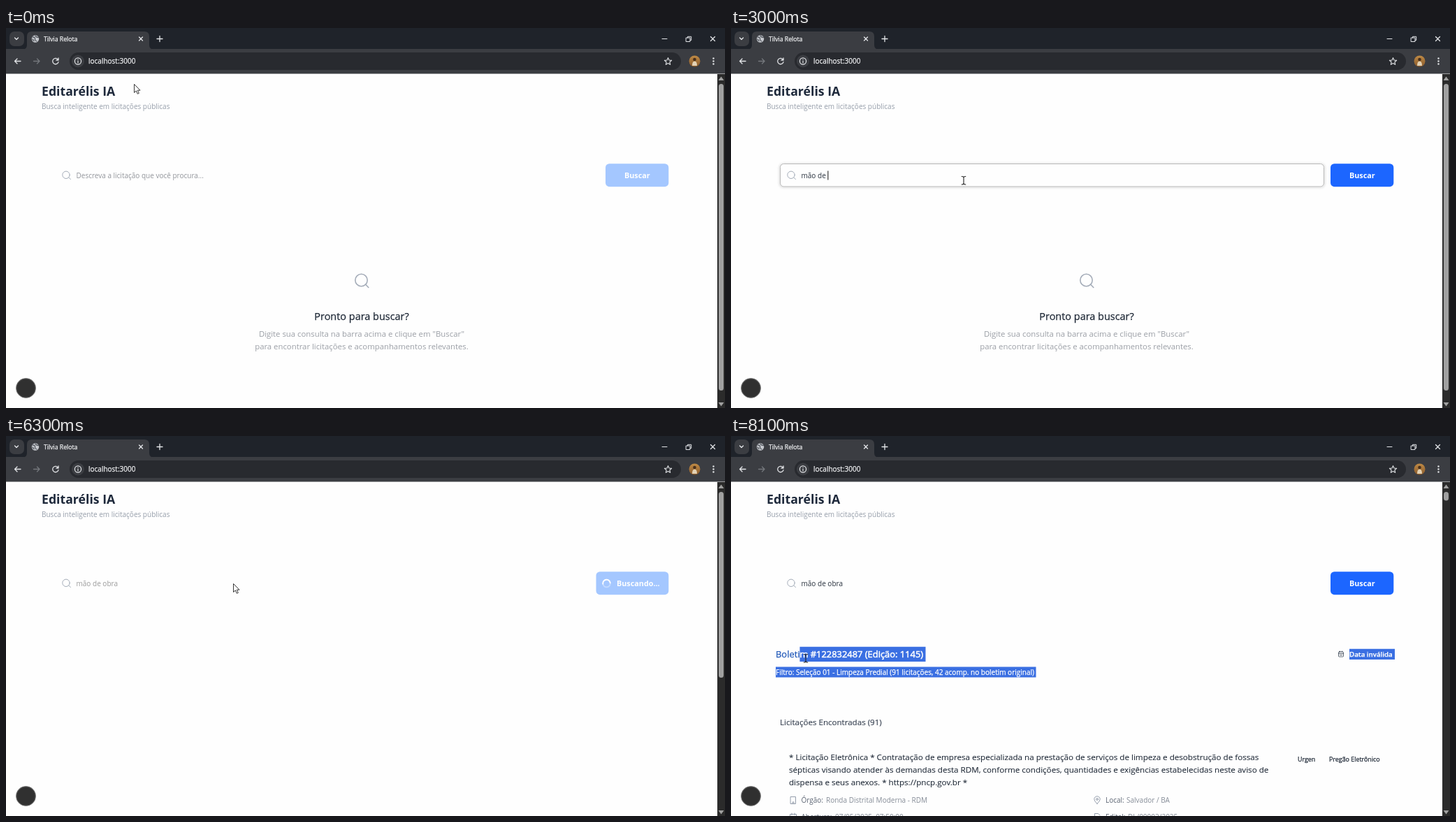
Animation, 1029 px wide and 544 px high, one loop 8200 ms. Source, as an HTML page:

```html
<!DOCTYPE html>
<html lang="pt-BR">
<head>
<meta charset="utf-8">
<title>Busca</title>
<style>
html, body { margin: 0; width: 100%; height: 100%; overflow: hidden; background: #fefefe; }
svg { display: block; width: 100vw; height: 100vh; }
text { font-family: 'Open Sans', 'Noto Sans', sans-serif; font-size: 10px; white-space: pre; }
.line { fill: none; stroke-linecap: round; stroke-linejoin: round; }
.semi { font-weight: 600; }
.bold { font-weight: 700; font-size: 10.8px; fill: #fff; }
.medium { stroke-width: .25; }
.dark { fill: #1f2937; stroke: #1f2937; }
.card { font-size: 11.64px; stroke-width: .1; }
.intro { font-size: 11.35px; fill: #9b9fa6; text-anchor: middle; }
.heading { font-size: 12.9px; }
.tag { font-size: 8.9px; }
.label { fill: #5b6472; }
.value { fill: #858c97; }
</style>
</head>
<body>
<svg viewBox="0 0 1029 544" preserveAspectRatio="none">
  <defs>
    <linearGradient id="photo" x1="0" y1="0" x2="0" y2="1">
      <stop offset="0" stop-color="#c08b45"/><stop offset="1" stop-color="#8a5a2b"/>
    </linearGradient>
    <filter id="soft" x="-5%" y="-30%" width="110%" height="160%"><feGaussianBlur stdDeviation="1.5"/></filter>
    <clipPath id="selClip">
      <rect id="selTitle" y="301.700" height="21.300"/>
      <rect id="selFilter" x="64" y="330.500" width="372.500" height="15"/>
      <rect id="selDate" x="885" y="304.700" width="65" height="15.300"/>
    </clipPath>
  </defs>
  <rect width="1029" height="544" fill="#fefefe"/>

  <!-- browser window -->
  <rect width="1029" height="31" fill="#1f232a"/>
  <rect y="30" width="1029" height="35.500" fill="#3b3d42"/>
  <rect x="5" y="5" width="21" height="21" rx="7" fill="#3b3d42"/>
  <path d="M23 31Q30 31 30 24V12Q30 5 37 5H198Q205 5 205 12V24Q205 31 212 31Z" fill="#3b3d42"/>
  <rect x="91" y="35" width="875" height="25" rx="12.500" fill="#282a2f"/>
  <circle cx="103" cy="47.500" r="9" fill="#3b3d42"/>
  <circle cx="42" cy="15.500" r="5.200" fill="#c6c9ce"/>
  <path d="M38 13Q42 13 41.500 15.500T44 19M42 11Q43 13.500 46.500 13.500M38 16L40 18.500" class="line" stroke="#565a61" stroke-width="1.300"/>
  <g class="medium" fill="#f0f1f3" stroke="#f0f1f3">
    <text x="54" y="19" style="font-size:8.7px">Tilvia Relota</text>
    <text x="118" y="51.300">localhost:3000</text>
  </g>
  <g class="line" stroke="#e3e5e8" stroke-width="1.300">
    <path d="M12.500 14L15 16.500L17.500 14"/>
    <path d="M190.500 13L195.500 18M195.500 13L190.500 18"/>
    <path d="M216 15.500H224M220 11.500V19.500"/>
    <path d="M939 15.500H946" stroke-width="1"/>
    <path d="M973.500 14H979V19.500H973.500ZM975.500 14V12.300H980.700V17.500H979" stroke-width="1"/>
    <path d="M1008.500 12.500L1014.500 18.500M1014.500 12.500L1008.500 18.500"/>
    <path d="M21 47.500H12.500M16 44L12.500 47.500L16 51"/>
    <path d="M39.500 47.500H48M44.500 44L48 47.500L44.500 51" stroke="#74777c"/>
    <path d="M74.500 45.300A4.200 4.200 0 1 0 75 48.600M75 43V46H72"/>
    <circle cx="103" cy="47.500" r="4.600" stroke-width="1.200"/>
    <path d="M103 47.300V49.800M103 45.300V45.400" stroke-width="1.200"/>
    <path id="star" stroke-width="1.100"/>
  </g>
  <circle cx="985.500" cy="47.500" r="8" fill="url(#photo)"/>
  <path d="M982 54Q982 47.500 985.500 47.500T989 54Z" fill="#e3d2b5"/>
  <circle cx="985.500" cy="45" r="2.300" fill="#47301d"/>
  <g fill="#e3e5e8"><circle cx="1012.500" cy="43.500" r="1.200"/><circle cx="1012.500" cy="47.500" r="1.200"/><circle cx="1012.500" cy="51.500" r="1.200"/></g>

  <!-- page header and search bar -->
  <text x="51" y="97.300" fill="#1e293b" style="font-size:17.7px;font-weight:700">Editarélis IA</text>
  <text x="51" y="116.300" fill="#969eaa">Busca inteligente em licitações públicas</text>
  <g id="focus">
    <rect x="69.500" y="194.500" width="780" height="33.500" rx="6" fill="none" stroke="#999" stroke-width="2" opacity=".35" filter="url(#soft)"/>
    <rect x="70.500" y="194.500" width="778" height="32.500" rx="5" fill="#fefefe" stroke="#b9b9b9"/>
  </g>
  <g class="line" stroke="#a5adb9" stroke-width="1">
    <circle cx="86" cy="210.300" r="5.200"/><path d="M89.800 214L92.500 216.700"/>
  </g>
  <text id="query" x="100.500" y="215"></text>
  <path id="caret" stroke="#111" stroke-width="1"/>
  <rect id="button" y="194.200" height="33" rx="5.500"/>
  <text id="buttonText" y="215" class="bold"></text>
  <g id="spinner" class="line" stroke="#fff" stroke-width="1.800">
    <circle r="5.300" opacity=".35"/><path d="M0 -5.300A5.300 5.300 0 0 1 0 5.300"/>
  </g>

  <g id="intro">
    <g class="line" stroke="#a5adb9" stroke-width="1.600">
      <circle cx="508.500" cy="361" r="8.700"/><path d="M514.800 367.300L518.800 371.500"/>
    </g>
    <text x="509" y="417.500" class="medium dark" text-anchor="middle" style="font-size:14.45px">Pronto para buscar?</text>
    <text x="509" y="442" class="intro">Digite sua consulta na barra acima e clique em "Buscar"</text>
    <text x="509" y="460.300" class="intro">para encontrar licitações e acompanhamentos relevantes.</text>
  </g>

  <g id="results">
    <text id="bulletin" x="64" y="317.300" class="medium heading" fill="#1f57b8" stroke="#1f57b8">Boletim #122832487 (Edição: 1145)</text>
    <text x="64" y="341.700" fill="#6b7280">Filtro: Seleção 01 - Limpeza Predial (91 licitações, 42 acomp. no boletim original)</text>
    <g class="line" stroke="#4b5563" stroke-width=".9">
      <rect x="869.500" y="309" width="7" height="7" rx="1"/><path d="M869.500 311.500H876.500M871.500 308V309.500M874.500 308V309.500M871.500 313.700H874.500"/>
    </g>
    <text x="885" y="316" class="semi" fill="#1f2937" style="font-size:9.75px">Data inválida</text>
    <text x="70" y="414" class="medium" fill="#374151" stroke="#374151" style="font-size:11.58px;stroke-width:.15">Licitações Encontradas (91)</text>
    <g class="medium dark">
      <text x="83" y="464" class="card">* Licitação Eletrônica * Contratação de empresa especializada na prestação de serviços de limpeza e desobstrução de fossas</text>
      <text x="83" y="482" class="card">sépticas visando atender às demandas desta RDM, conforme condições, quantidades e exigências estabelecidas neste aviso de</text>
      <text x="83" y="500" class="card">dispensa e seus anexos. * https://pncp.gov.br *</text>
      <text x="811" y="465.500" class="tag">Urgen</text>
      <text x="856" y="465.500" class="tag">Pregão Eletrônico</text>
    </g>
    <g class="line" stroke="#8a93a3" stroke-width=".9">
      <path d="M85.500 516.500H92.500V526.500H85.500ZM88 526V524H90V526"/>
      <path d="M524 526.500Q519.800 522.500 519.800 520A4.200 4.200 0 0 1 528.200 520Q528.200 522.500 524 526.500Z"/><circle cx="524" cy="520" r="1.400"/>
      <path d="M84.500 544V541.500H93.500V544M87 540V542.500M91 540V542.500M520.500 544V540.500H525.500L528 543"/>
    </g>
    <g class="label">
      <text x="100.500" y="525">Órgão:</text><text x="536" y="525">Local:</text>
      <text x="100.500" y="548.500">Abertura:</text><text x="536" y="548.500">Edital:</text>
    </g>
    <g class="value">
      <text x="136" y="525">Ronda Distrital Moderna - RDM</text><text x="566" y="525">Salvador / BA</text>
      <text x="149" y="548.500">07/05/2025, 07:50:00</text><text x="568" y="548.500">DL/00002/2025</text>
    </g>
    <g id="selection" clip-path="url(#selClip)" class="medium" fill="#fff" stroke="#fff">
      <rect x="60" y="300" width="900" height="48" fill="#3a6fe2" stroke="none"/>
      <text x="64" y="317.300" class="heading" stroke-width=".5">Boletim #122832487 (Edição: 1145)</text>
      <text x="64" y="341.700">Filtro: Seleção 01 - Limpeza Predial (91 licitações, 42 acomp. no boletim original)</text>
      <text x="885" y="316" class="semi" style="font-size:9.75px">Data inválida</text>
    </g>
  </g>

  <circle cx="28.500" cy="515.500" r="13.700" fill="#303030" stroke="#5c5c5c" stroke-width="1.200"/>

  <!-- scrollbar -->
  <rect x="1018" y="66" width="11" height="478" fill="#2b2b2b"/>
  <rect id="thumb" x="1020" y="80" width="7" rx="3.500" fill="#a0a0a0"/>
  <path d="M1019.500 75L1023.500 69.500L1027.500 75ZM1019.500 536L1023.500 541.500L1027.500 536Z" fill="#a0a0a0"/>

  <path id="arrow" d="M.5 .5V12.500L3.300 9.900L5.300 14.300L7.300 13.400L5.300 9.200H9Z" fill="#fff" stroke="#222" stroke-width=".9"/>
  <path id="beam" d="M5.200 1.500Q8 1.500 8 3V11.500Q8 13 5.200 13M10.800 1.500Q8 1.500 8 3M8 11.500Q8 13 10.800 13" class="line" stroke="#222" stroke-width="1.100"/>
</svg>
<script>
const LOOP = 8200, STEP = 100;
const FOCUS = 2000, TYPE = 2270, KEY = 120, SUBMIT = 3800, RESULT = 6400, DRAG = 7600;
const QUERY = 'mão de obra', HINT = 'Descreva a licitação que você procura...';

// pointer tip: time, x, y
const path = [
  [0, 183, 80], [100, 183, 80], [700, 395, 205], [900, 402, 211], [1400, 402, 211],
  [1900, 325, 211], [6500, 325, 211], [7400, 431, 324], [DRAG, 431, 324], [8100, 99, 311]
];

const $ = id => document.getElementById(id);
const set = (id, attrs) => { for (const k in attrs) $(id).setAttribute(k, attrs[k]); };
const show = (id, on) => { $(id).style.display = on ? '' : 'none'; };
const ease = p => p * p * (3 - 2 * p);

function pointer(t) {
  let i = 1;
  while (i < path.length - 1 && t > path[i][0]) i++;
  const [t0, x0, y0] = path[i - 1], [t1, x1, y1] = path[i];
  const p = ease(Math.min(1, (t - t0) / (t1 - t0)));
  return [x0 + (x1 - x0) * p, y0 + (y1 - y0) * p];
}

// character edge of the bulletin heading nearest to x
function snap(x) {
  const el = $('bulletin'), n = el.getNumberOfChars();
  let best = el.getEndPositionOfChar(n - 1).x;
  for (let i = 0; i < n; i++) {
    const edge = el.getStartPositionOfChar(i).x;
    if (Math.abs(edge - x) < Math.abs(best - x)) best = edge;
  }
  return best;
}

function drawSearch(t, loading) {
  const focused = t >= FOCUS && t < SUBMIT;
  const count = t < TYPE ? 0 : Math.min(QUERY.length, 1 + Math.floor((t - TYPE) / KEY));
  const query = $('query');
  query.textContent = count ? QUERY.slice(0, count) : HINT;
  set('query', { fill: !count ? '#92959b' : loading ? '#9b9b9b' : '#27303c' });
  show('focus', focused);
  show('caret', focused);
  const x = 101 + (count ? query.getComputedTextLength() : 0);
  set('caret', { d: `M${x} 204.500V217.500` });

  const left = loading ? 844.5 : 858;
  set('button', { x: left, width: 948.3 - left, fill: count && !loading ? '#1c66ff' : '#a4c7ff' });
  set('buttonText', { x: loading ? 874 : 885 });
  $('buttonText').textContent = loading ? 'Buscando...' : 'Buscar';
  show('spinner', loading);
  set('spinner', { transform: `translate(859.500 211) rotate(${190 + (t - 4100) * .36})` });
}

function drawPointer(t, loading) {
  const [x, y] = pointer(t);
  const inField = x > 70 && x < 849 && y > 194 && y < 227;
  const dragging = t > DRAG;
  const beam = dragging || (inField && !loading);
  show('beam', beam);
  show('arrow', !beam);
  set(beam ? 'beam' : 'arrow', { transform: `translate(${x} ${y})` });

  show('selection', dragging);
  if (dragging) {
    const start = snap(x);
    set('selTitle', { x: start, width: Math.max(0, 278.5 - start) });
  }
}

function draw(t) {
  const loading = t >= SUBMIT && t < RESULT;
  show('intro', t < SUBMIT);
  show('results', t >= RESULT);
  set('thumb', { height: t < SUBMIT ? 439 : loading ? 266 : 12.5 });
  drawSearch(t, loading);
  drawPointer(t, loading);
}

const points = Array.from({ length: 10 }, (_, i) => {
  const a = i * Math.PI / 5, r = i % 2 ? 2.5 : 5.4;
  return `${947.5 + r * Math.sin(a)} ${48 - r * Math.cos(a)}`;
});
set('star', { d: `M${points.join('L')}Z` });

const begin = performance.now();
function tick() {
  const t = (performance.now() - begin) % LOOP;
  draw(Math.floor(t / STEP) * STEP);
  requestAnimationFrame(tick);
}
draw(0);
requestAnimationFrame(tick);
</script>
</body>
</html>
```
